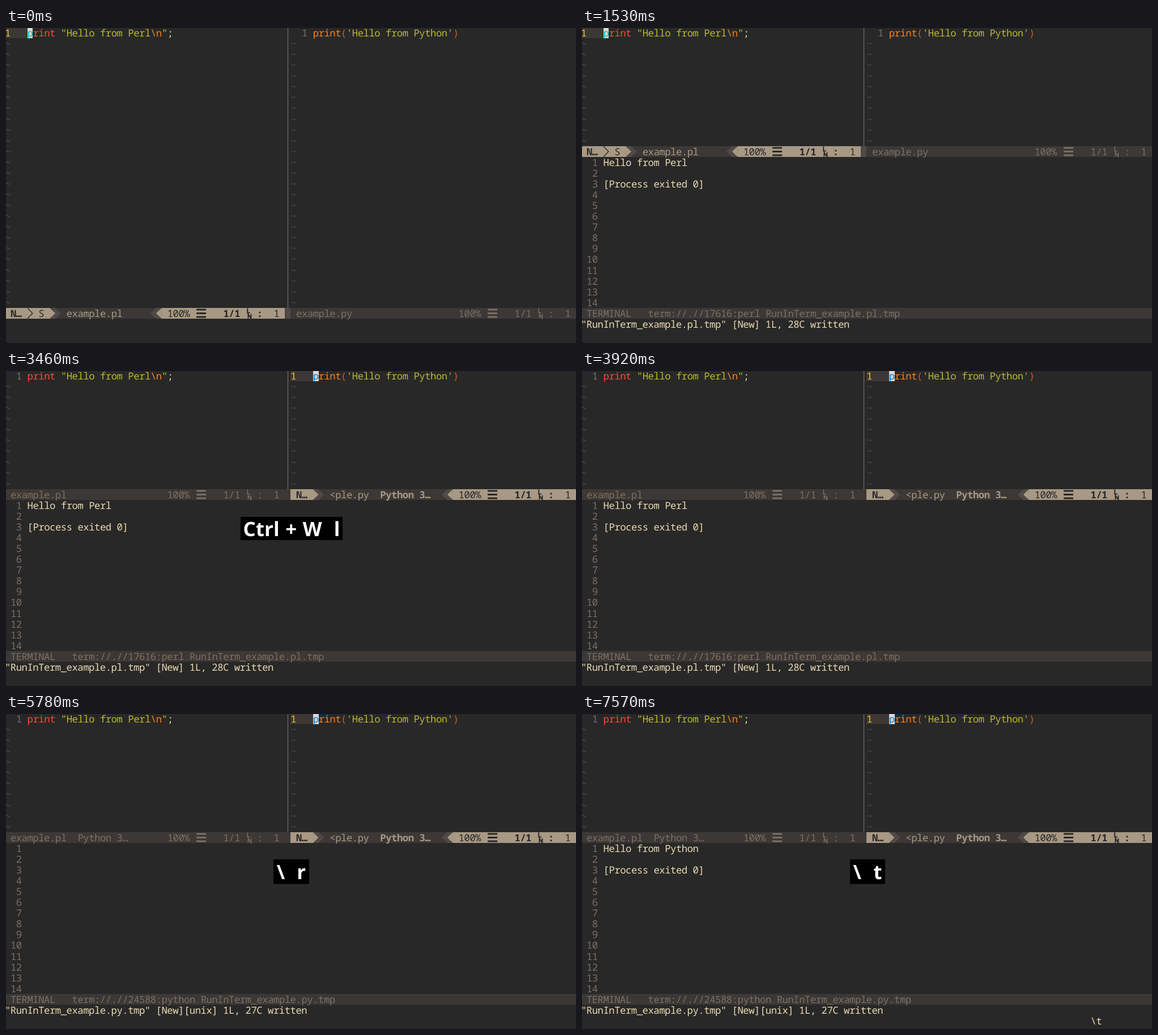
Recreate the animation shown at these times as an HTML page. Size 1006 px wide and 557 px high, loop 8 s.

```html
<!DOCTYPE html>
<html lang="en">
<head>
<meta charset="utf-8">
<title>Running code in a split terminal</title>
<style>
  html, body { margin: 0; width: 100%; height: 100%; overflow: hidden; background: #282828; }
  svg { display: block; width: 1006px; height: 557px; }
  text {
    white-space: pre; text-rendering: geometricPrecision;
    font: 17.3px "Noto Sans Mono", monospace; letter-spacing: calc(9.885px - 0.6em);
  }
  .bold { font-weight: 700; }
  .keys {
    font: 700 35px "Open Sans", "Noto Sans", sans-serif; letter-spacing: 0; word-spacing: 1.5px;
    text-anchor: middle; fill: #fff;
  }
</style>
</head>
<body>
<svg id="stage" viewBox="0 0 1006 557"></svg>
<script>
const CELL = 9.885, LINE = 19.07, LOOP = 8000;
const C = {
  bg: '#282828', fg: '#ebdbb2', red: '#fb4934', green: '#b8bb26', orange: '#fe8019',
  paren: '#d65d0e', yellow: '#fabd2f', number: '#7c6f64', tilde: '#504945', bar: '#3c3836',
  edge: '#504945', accent: '#a89984', split: '#665c54', cursor: '#d7d7d7'
};
const stage = document.getElementById('stage');

const x = col => col * CELL - 2;
const y = row => row * LINE - 0.7;
const escape = s => s.replace(/&/g, '&amp;').replace(/</g, '&lt;');
const range = (from, to) => Array.from({ length: to - from + 1 }, (_, i) => from + i);

const text = (col, row, str, fill, bold) =>
  `<text x="${x(col)}" y="${y(row) + 15.7}" fill="${fill}"${bold ? ' class="bold"' : ''}>${escape(str)}</text>`;

const box = (col, row, cols, fill) =>
  `<rect x="${Math.round(x(col))}" y="${Math.round(y(row))}" width="${Math.round(x(col + cols)) - Math.round(x(col))}" height="19" fill="${fill}"/>`;

// Powerline triangle filling one cell, pointing right (1) or left (-1)
function arrow(col, row, dir, fill) {
  const top = Math.round(y(row));
  const base = x(dir > 0 ? col : col + 1), tip = x(dir > 0 ? col + 1 : col);
  return `<path d="M${base} ${top}L${tip} ${top + 9.5}L${base} ${top + 19}z" fill="${fill}"/>`;
}

// Percentage, menu bars and line/column position
function position(col, row, fill, active) {
  const top = Math.round(y(row)), bars = x(col + 5) + 2, ln = x(col + 14) + 3.2;
  return text(col, row, '100%', fill) +
    `<path d="M${bars} ${top + 3}h17m-17 6.5h17m-17 6.5h17" stroke="${fill}" stroke-width="3"/>` +
    text(col + 10, row, '1/1', fill, active) +
    `<path d="M${ln} ${top + 0.5}v8h4.5M${ln + 1.2} ${top + 18.5}v-7.5l5 7.5v-7.5" fill="none" stroke="${fill}" stroke-width="${active ? 2 : 1.4}"/>` +
    text(col + 16, row, ':', fill, active) + text(col + 19, row, '1', fill);
}

function modeSection(row, start, spell) {
  const end = start + (spell ? 8 : 4);
  let out = box(start, row, end - start, C.accent) + box(end, row, 1, C.edge) +
    arrow(end, row, 1, C.accent) + arrow(end + 1, row, 1, C.edge) +
    text(start + 1, row, 'N…', C.bg, true);
  if (spell) {
    const left = x(start + 4) + 0.7, top = Math.round(y(row));
    out += `<path d="M${left} ${top + 0.5}l8.6 9l-8.6 9" fill="none" stroke="${C.bg}" stroke-width="1.3"/>` +
      text(start + 6, row, 'S', C.bg);
  }
  return out;
}

function statusLine(row, pane, active, env) {
  const { start, end, stat } = pane;
  let out = box(start, row, end - start, C.bar);
  if (!active) {
    return out + text(start + 1, row, pane.file, C.number) +
      (env ? text(start + 13, row, 'Python 3…', C.number) : '') +
      position(stat, row, C.number, false);
  }
  out += modeSection(row, start, pane.spell) +
    arrow(stat - 3, row, -1, C.edge) + box(stat - 2, row, 1, C.edge) + arrow(stat - 2, row, -1, C.accent) +
    box(stat - 1, row, end - stat + 1, C.accent) + position(stat, row, C.bg, true);
  return out + (pane.spell
    ? text(start + 11, row, pane.file, C.accent)
    : text(start + 7, row, '<ple.py', C.accent) + text(start + 16, row, 'Python 3…', C.accent, true));
}

const panes = [
  { start: 0, end: 50, stat: 29, file: 'example.pl', spell: true, cursorInk: '#04b6cb',
    code: [['print', C.red], [' "Hello from Perl', C.green], ['\\n', C.orange], ['"', C.green], [';', C.fg]] },
  { start: 51, end: 102, stat: 81, file: 'example.py', cursorInk: '#017fe6',
    code: [['print', C.orange], ['(', C.paren], ["'Hello from Python'", C.green], [')', C.paren]] }
];

function editor(pane, index, s, statusRow) {
  const active = s.active === index, { start } = pane;
  let col = start + 4;
  let out = active
    ? box(start, 0, 4, C.bar) + text(start, 0, '1', C.yellow)
    : text(start + 2, 0, '1', C.number);
  for (const [str, fill] of pane.code) {
    out += text(col, 0, str, fill);
    col += str.length;
  }
  if (active && s.cursor) out += box(start + 4, 0, 1, C.cursor) + text(start + 4, 0, 'p', pane.cursorInk);
  for (const row of range(1, statusRow - 1)) out += text(start, row, '~', C.tilde);
  return out + statusLine(statusRow, pane, active, s.env);
}

function terminal(s) {
  let out = box(0, 26, 102, C.bar) + text(1, 26, 'TERMINAL', C.number) +
    text(12, 26, 'term://.//' + s.term, C.number);
  for (const n of range(1, 14)) out += text(1, 11 + n, String(n).padStart(2), C.number);
  if (s.output) out += text(4, 12, s.output, C.fg) + text(4, 14, '[Process exited 0]', C.fg);
  return out;
}

// Key caption: text, box width and opacity
function caption(s) {
  if (!s.keys) return '';
  const w = { '\\': 30, '\\  r': 63, '\\  t': 62, 'Ctrl + W': 152, 'Ctrl + W  l': 180 }[s.keys];
  const tall = s.keys[0] === '\\', left = Math.round(503.5 - w / 2);
  return `<g opacity="${s.fade}"><rect x="${left}" y="${tall ? 257 : 258}" width="${w}" height="${tall ? 43.5 : 41}"/>` +
    `<text class="keys" x="${left + w / 2}" y="291.5">${s.keys}</text></g>`;
}

function draw(s) {
  const statusRow = s.term ? 11 : 26;
  stage.innerHTML = '<rect width="1006" height="557" fill="#282828"/>' +
    panes.map((p, i) => editor(p, i, s, statusRow)).join('') +
    `<rect x="496.7" width="1.6" height="${Math.round(y(statusRow))}" fill="${C.split}"/>` +
    box(50, statusRow, 1, s.active === 0 ? C.edge : C.bar) +
    (s.term ? terminal(s) : '') +
    text(0, 27, s.message, C.fg) + text(91, 28, s.pending, C.fg) + caption(s);
}

// Each step changes only the listed parts of the state
const steps = [
  [0, { active: 0, cursor: true, env: false, term: '', output: '', message: '', pending: '', keys: '', fade: 1 }],
  [530, { keys: '\\', pending: '\\' }],
  [610, { keys: '\\  r', pending: '', cursor: false, message: '"RunInTerm_example.pl.tmp" [New] 1L, 28C written' }],
  [840, { cursor: true, term: '17616:perl RunInTerm_example.pl.tmp' }],
  [990, { output: 'Hello from Perl' }],
  [1450, { fade: 0.5 }],
  [1530, { keys: '', fade: 1 }],
  [2770, { keys: 'Ctrl + W', pending: '^W' }],
  [3000, { keys: 'Ctrl + W  l', pending: '^Wl', cursor: false }],
  [3460, { active: 1, cursor: true, pending: '' }],
  [3690, { fade: 0.5 }],
  [3920, { keys: '', fade: 1 }],
  [5170, { keys: '\\', pending: '\\' }],
  [5250, { keys: '\\  r', pending: '\\r' }],
  [5330, { pending: '', cursor: false }],
  [5410, { message: '"RunInTerm_example.py.tmp" [New][unix] 1L, 27C written' }],
  [5780, { cursor: true, env: true, output: '', term: '24588:python RunInTerm_example.py.tmp' }],
  [5870, { output: 'Hello from Python' }],
  [6100, { fade: 0.5 }],
  [6180, { keys: '', fade: 1 }],
  [7420, { keys: '\\', pending: '\\' }],
  [7570, { keys: '\\  t', pending: '\\t' }]
];

let shown = -1;
const begin = performance.now();
function tick() {
  const t = (performance.now() - begin) % LOOP;
  const current = steps.filter(([at]) => at <= t).length;
  if (current !== shown) {
    shown = current;
    draw(Object.assign({}, ...steps.slice(0, current).map(([, change]) => change)));
  }
  requestAnimationFrame(tick);
}
tick();
</script>
</body>
</html>
```
